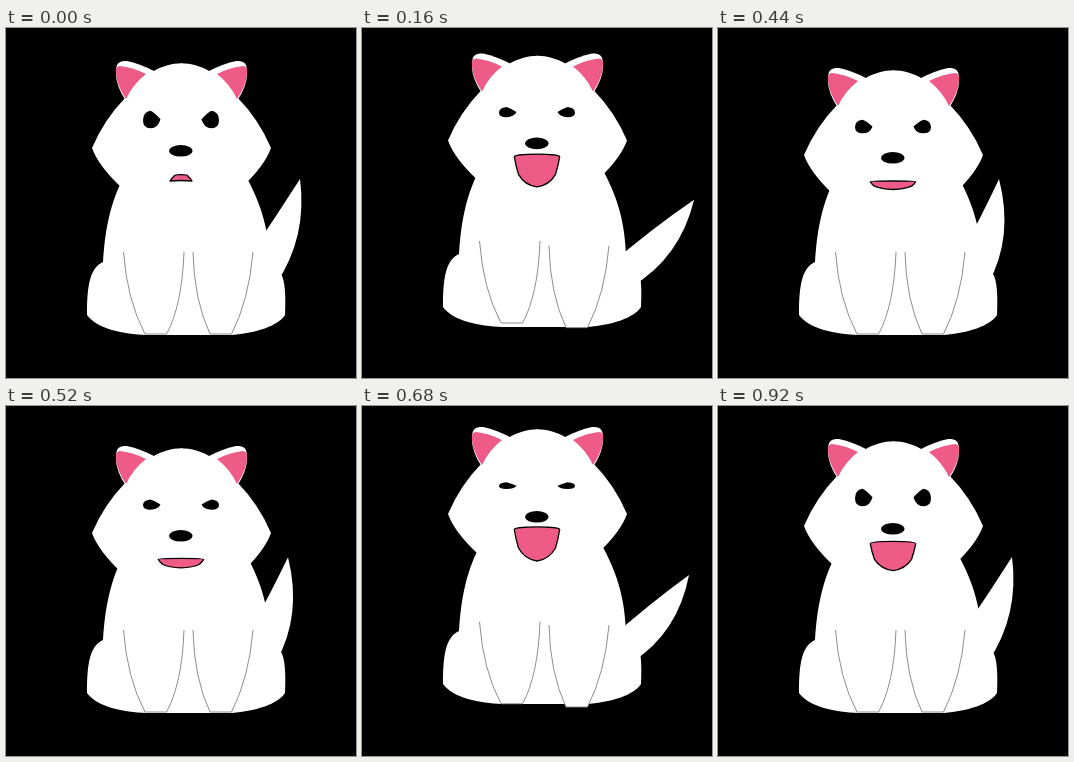
An HTML page with a canvas that plays this animation: 350x350 px, repeating every 0.96 s.

```html
<!DOCTYPE html>
<html lang="en">
<head>
<meta charset="utf-8">
<title>Bouncing dog</title>
<style>
  html, body { margin: 0; width: 100%; height: 100%; overflow: hidden; background: #000; }
  canvas { display: block; width: 350px; height: 350px; }
</style>
</head>
<body>
<canvas id="stage" width="350" height="350"></canvas>
<script>
const ctx = document.getElementById('stage').getContext('2d');
const LOOP = 960, STEP = 40;
const WHITE = '#fff', PINK = '#ee5b87', BLACK = '#000';

const clamp = u => Math.min(1, Math.max(0, u));
const mix = (a, b, u) => a + (b - a) * u;
const smooth = u => (1 - Math.cos(Math.PI * u)) / 2;
const easeOut = u => Math.sin(u * Math.PI / 2);

// Adds one eased move after another: each starts and ends at the given times.
function move(t, from, to, start, end, ease = smooth) {
  return (to - from) * ease(clamp((t - start) / (end - start)));
}

// A smooth upward hop between two times.
function hop(t, start, end, height) {
  return -height * Math.sin(Math.PI * clamp((t - start) / (end - start))) ** 2;
}

// Two bounces per loop: a long one, then a short one.
function poseAt(t) {
  return {
    head: move(t, 0, -12, 0, 120) + move(t, -12, 7, 120, 380, easeOut)
        + move(t, 7, -12, 560, 680) + move(t, -12, 8, 680, 800) + move(t, 8, 0, 800, 920),
    body: hop(t, 0, 320, 8) + hop(t, 530, 840, 9),
    pawL: hop(t, 20, 300, 11) + hop(t, 600, 840, 11),
    pawR: hop(t, 60, 310, 7) + hop(t, 610, 830, 7),
    tailX: 294 + move(t, 294, 337, 0, 205) + move(t, 337, 281, 205, 420)
         + move(t, 281, 331, 500, 720) + move(t, 331, 294, 720, 920),
    tailY: 151 + move(t, 151, 174, 0, 200) + move(t, 174, 151, 200, 440)
         + move(t, 151, 176, 500, 780) + move(t, 176, 151, 780, 920),
    eye: 9 + move(t, 9, 5.3, 0, 140) + move(t, 5.3, 7, 160, 280)
       + move(t, 7, 3.5, 440, 600) + move(t, 3.5, 9, 800, 920),
    open: move(t, 0, 1, 0, 130) + move(t, 1, 0, 140, 280) + move(t, 0, 0.06, 280, 440)
        + move(t, 0.06, 1, 500, 660) + move(t, 1, 0.12, 700, 800) + move(t, 0.12, 0.82, 800, 920),
    smile: smooth(clamp(t / 120))
  };
}

function shape(path, fill, line, width) {
  const p = new Path2D(path);
  ctx.fillStyle = fill;
  ctx.fill(p);
  if (line) {
    ctx.strokeStyle = line;
    ctx.lineWidth = width;
    ctx.stroke(p);
  }
}

function shifted(dy, draw) {
  ctx.save();
  ctx.translate(0, dy);
  draw();
  ctx.restore();
}

function bothSides(span, draw) {
  draw();
  ctx.save();
  ctx.translate(span, 0);
  ctx.scale(-1, 1);
  draw();
  ctx.restore();
}

function drawTail({ tailX: x, tailY: y, body }) {
  const swing = x - 281, drop = y - 151;
  const baseY = 222 + swing * 0.25 + drop * 0.6 + body;
  const midX = (245 + x) / 2, midY = (baseY + y) / 2 + 3 - swing * 0.14;
  shape(`M245 ${baseY} Q${midX} ${midY} ${x} ${y}
    Q${296 + swing * 0.43} ${y + 58} 270 ${256 + drop * 0.5 + body} Z`, WHITE);
}

function drawBody() {
  shape('M120 145 C103 175 99 205 97 234 C84 240 81 257 81 287 C91 301 118 306 140 307 ' +
        'L226 307 C250 305 272 298 279 287 C280 268 279 252 275 246 L264 236 ' +
        'C263 205 257 178 238 145 Z', WHITE);
}

function drawLeg(path) {
  shape(path, WHITE, '#808080', 0.9);
}

function drawEye(open) {
  const top = 91.7 - open, bottom = 91.7 + open * 0.95;
  shape(`M137 92 Q137 ${top + open * 0.15} 144.5 ${top} Q149 ${92 - open * 0.8} 154.5 ${92 - open * 0.08}
    Q152 ${bottom} 144.5 ${bottom} Q137 ${bottom} 137 92 Z`, BLACK);
}

function drawMouth(open, smile) {
  const c = 175, top = mix(7, 22.7, smile), low = mix(11, 18.5, smile);
  const lip = mix(148.2, 147.5, smile) - 12 * open;
  const side = mix(153, 151, smile) + 3 * open;
  const chin = mix(152.5, 153.7, smile) + 13.3 * open;
  const arch = mix(2, 1, smile) + 2.5 * open;
  const bend = (lip + side) / 2, under = chin - (chin - side) * 0.12;
  const waist = (top + low) / 2 + 0.7;
  shape(`M${c - top} ${lip} C${c - top} ${lip - arch} ${c + top} ${lip - arch} ${c + top} ${lip}
    Q${c + waist} ${bend} ${c + low} ${side}
    Q${c + low * 0.66} ${under} ${c} ${chin}
    Q${c - low * 0.66} ${under} ${c - low} ${side}
    Q${c - waist} ${bend} ${c - top} ${lip} Z`, PINK, BLACK, 1.3);
}

function drawHead({ eye, open, smile }) {
  bothSides(351, () => {
    shape('M110 46 C110 35 112 33 121 33 Q135 36 150 44 L120 73 Q110 58 110 46 Z', WHITE);
    shape('M176 35.3 C155 35.3 137 47 120 69 Q98 91.5 86 120 Q92.5 138 115 159 L176 159 Z', WHITE);
    shape('M110 46 Q109 38 114 38 Q126 39 140 46 Q127 56 120 71 Q111 58 110 46 Z', PINK);
  });
  bothSides(350, () => drawEye(eye));
  ctx.fillStyle = BLACK;
  ctx.beginPath();
  ctx.ellipse(174.8, 122.8, 11.7, 5.8, 0, 0, Math.PI * 2);
  ctx.fill();
  drawMouth(open, smile);
}

function render(t) {
  const pose = poseAt(t);
  ctx.fillStyle = BLACK;
  ctx.fillRect(0, 0, 350, 350);
  ctx.lineJoin = 'round';
  drawTail(pose);
  shifted(pose.body, drawBody);
  shifted(pose.pawL, () => drawLeg('M117.5 224 Q121 272 139 306 L160.5 306 Q176 278 178 224'));
  shifted(pose.pawR, () => drawLeg('M187 224 Q188 272 204 306 L225.5 306 Q243 272 247 224'));
  shifted(pose.head, () => drawHead(pose));
}

const start = performance.now();
function tick() {
  const t = (performance.now() - start) % LOOP;
  render(Math.floor(t / STEP) * STEP);
  requestAnimationFrame(tick);
}
tick();
</script>
</body>
</html>
```
